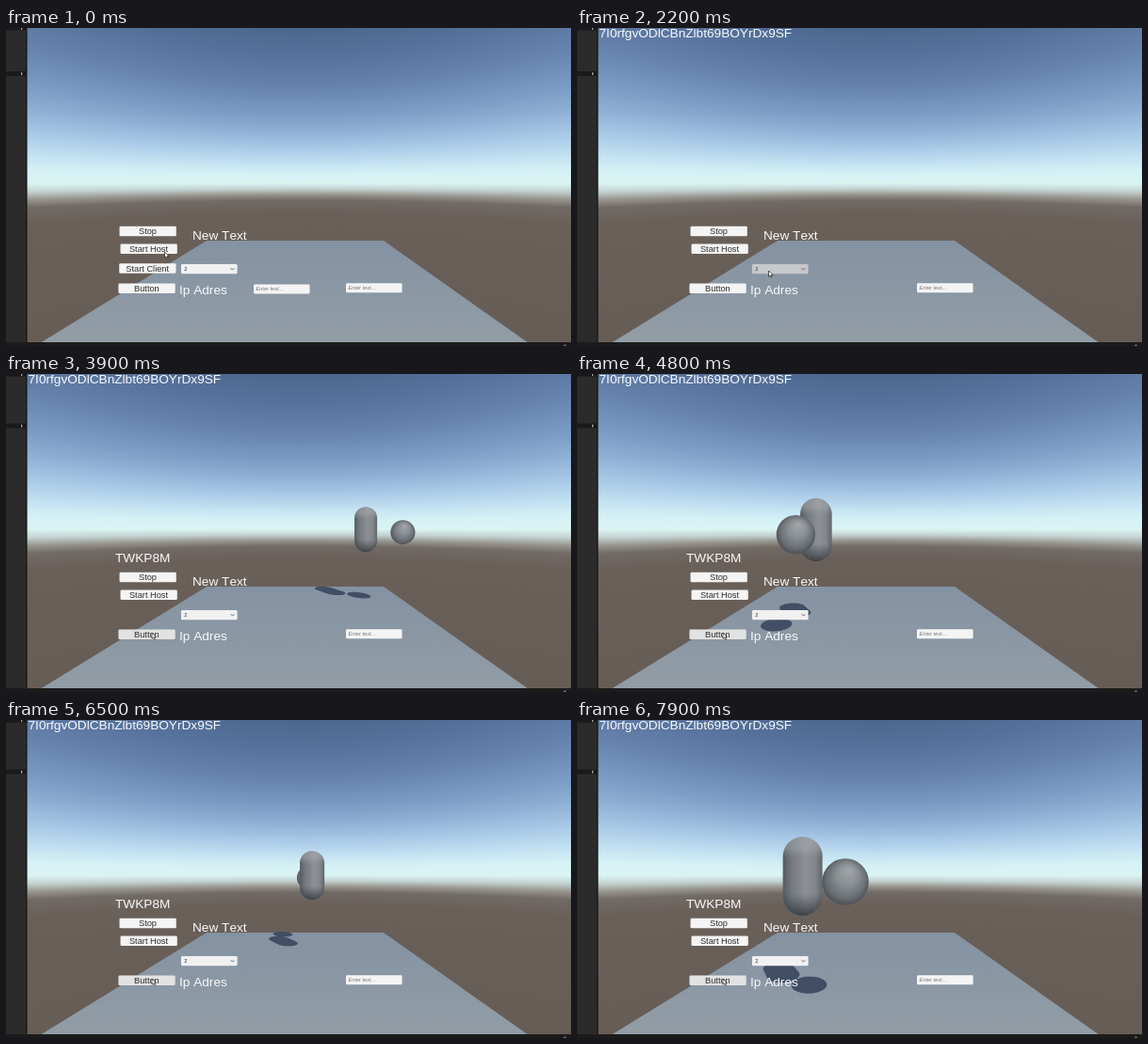
These frames come from a looping animation (600x338 px, 8000 ms). An HTML page with a canvas:

```html
<!DOCTYPE html>
<html lang="en">
<head>
<meta charset="utf-8">
<title>Network lobby scene</title>
<style>
html, body { margin: 0; width: 100%; height: 100%; overflow: hidden; background: #2b2b2b; }
canvas, svg { position: absolute; left: 0; top: 0; width: 600px; height: 338px; }
text { font-family: "Liberation Sans", Arial, sans-serif; font-kerning: none; }
.big { font-size: 13.65px; fill: #f8f9fa; }
.label { font-size: 9.25px; fill: #2e2e2e; text-anchor: middle; }
.hint { font-size: 5.6px; font-style: italic; fill: #767676; }
.value { font-size: 5.6px; fill: #323232; }
</style>
</head>
<body>
<canvas id="sky" width="600" height="338"></canvas>
<svg id="stage" viewBox="0 0 600 338">
  <defs>
    <radialGradient id="ball" cx=".5" cy=".5" r=".56" fx=".58" fy=".24">
      <stop offset="0" stop-color="#a3a7aa"/>
      <stop offset=".4" stop-color="#8b9094"/>
      <stop offset=".75" stop-color="#696e73"/>
      <stop offset="1" stop-color="#41464b"/>
    </radialGradient>
    <linearGradient id="tube">
      <stop offset="0" stop-color="#555b61"/>
      <stop offset=".22" stop-color="#74797e"/>
      <stop offset=".58" stop-color="#8d9195"/>
      <stop offset=".82" stop-color="#81868a"/>
      <stop offset="1" stop-color="#60656a"/>
    </linearGradient>
    <linearGradient id="caps" x2="0" y2="1">
      <stop offset="0" stop-color="#b4bac0" stop-opacity=".35"/>
      <stop offset=".14" stop-color="#b0b4b8" stop-opacity=".4"/>
      <stop offset=".27" stop-color="#a0a4a8" stop-opacity="0"/>
      <stop offset=".72" stop-color="#34393e" stop-opacity="0"/>
      <stop offset="1" stop-color="#30353a" stop-opacity=".85"/>
    </linearGradient>
    <linearGradient id="floor" x2="0" y2="1">
      <stop offset="0" stop-color="#8492a2"/>
      <stop offset="1" stop-color="#929da5"/>
    </linearGradient>
  </defs>
  <path d="M213 226H401L555 335H36Z" fill="url(#floor)"/>
  <g id="scene">
    <path id="tubeShadow" fill="#414e65"/>
    <path id="ballShadow" fill="#414e65"/>
    <g id="solids">
      <g id="capsule">
        <rect x="-.5" y="-1" width="1" height="2" rx=".5" fill="url(#tube)"/>
        <rect x="-.5" y="-1" width="1" height="2" rx=".5" fill="url(#caps)"/>
      </g>
      <circle id="sphere" r=".5" fill="url(#ball)"/>
    </g>
  </g>
  <g id="ui"></g>
  <g id="frame">
    <path d="M0 0H22V338H0Z" fill="#2b2b2b"/>
    <path d="M0 0H22V2.5H0ZM21 0H22.5V338H21Z" fill="#191919"/>
    <g id="divider">
      <path d="M0 46H21V51H0Z" fill="#1a1a1a"/>
      <path d="M16 47.3h1.2v2.6h-1.2z" fill="#b5b5b5"/>
    </g>
    <path d="M16 0h1.2v2h-1.2z" fill="#a5a5a5"/>
    <path d="M0 334H600V338H0Z" fill="#1b1b1b"/>
    <path d="M592.5 336.6h2v1.4h-2z" fill="#8a8a8a"/>
  </g>
  <path id="cursor" d="M0 0V6.2L1.5 4.9 2.5 7.1 3.6 6.6 2.6 4.5H4.5Z" fill="#fff" stroke="#1c1c1c" stroke-width=".7"/>
</svg>
<script>
const LOOP = 8000, STEP = 100;
const CX = 314, CY = 164, FOCAL = 284, GROUND = 3.3;
const $ = id => document.getElementById(id);

function paintSky() {
  const ctx = $("sky").getContext("2d");
  const fill = ctx.createLinearGradient(0, -164, 0, 176);
  const stops = [[0, "#4c678f"], [30, "#56729c"], [60, "#6480ab"], [90, "#7a99c3"],
    [110, "#90afd5"], [130, "#accce8"], [145, "#c5e3f2"], [155, "#d5f1f5"],
    [165, "#daf4f2"], [171, "#c3d2d0"], [177, "#98958f"], [183, "#716a65"],
    [196, "#6a605a"], [340, "#655b55"]];
  stops.forEach(([y, c]) => fill.addColorStop(y / 340, c));
  ctx.fillStyle = fill;
  // Lines of equal elevation bend into hyperbolas away from the centre.
  for (let x = 22; x < 600; x++) {
    ctx.setTransform(1, 0, 0, Math.hypot(1, (x - CX) / FOCAL), 0, CY);
    ctx.fillRect(x, -170, 1, 350);
  }
}

function add(parent, tag, attrs, text) {
  const el = document.createElementNS("http://www.w3.org/2000/svg", tag);
  for (const key in attrs) el.setAttribute(key, attrs[key]);
  if (text) el.textContent = text;
  parent.appendChild(el);
  return el;
}

const ui = $("ui");
const group = () => add(ui, "g", {});
const box = (g, x, y, w = 60, h = 10.3) =>
  add(g, "rect", { x, y, width: w, height: h, rx: 1.3, fill: "#f4f4f4" });
const big = (x, y, s) => add(ui, "text", { class: "big", x, y }, s);

function button(x, y, s) {
  const g = group(), rect = box(g, x, y, 60.3, 10.5);
  add(g, "text", { class: "label", x: x + 30, y: y + 8.4 }, s);
  return { g, rect };
}

function input(x, y) {
  const g = group();
  box(g, x, y, 59.6, 10);
  add(g, "text", { class: "hint", x: x + 2.6, y: y + 6.9 }, "Enter text...");
  return g;
}

function dropdown(x, y) {
  const g = group(), rect = box(g, x, y, 59.6, 10.2);
  add(g, "text", { class: "value", x: x + 3.3, y: y + 7 }, "2");
  add(g, "path", { d: `M${x + 52.6} ${y + 4.2}l1.9 1.9 1.9-1.9`, fill: "none", stroke: "#444", "stroke-width": .8 });
  return rect;
}

function optionList(x, y) {
  const g = group();
  box(g, x, y, 59.6, 17.6);
  ["2", "3"].forEach((s, i) =>
    add(g, "text", { class: "value", x: x + 7, y: y + 6.8 + i * 8.3 }, s));
  add(g, "path", { d: `M${x + 2.3} ${y + 5}l1.2 1.5 2-3`, fill: "none", stroke: "#333", "stroke-width": .7 });
  return g;
}

const idText = big(23.5, 10.3, "7I0rfgvODlCBnZlbt69BOYrDx9SF");
const joinCode = big(116, 200.3, "TWKP8M");
big(198, 224.9, "New Text");
big(184, 283, "Ip Adres");
button(120.5, 210.8, "Stop");
button(121.5, 229.6, "Start Host");
const client = button(120.2, 250.2, "Start Client");
const spawn = button(119.4, 271.6, "Button");
const address = input(263, 272.4);
input(361, 271.2);
const picker = dropdown(186, 251);
const options = optionList(186, 261.2);

const clamp = v => Math.max(0, Math.min(1, v));
const ramp = (t, a, b) => clamp((t - a) / (b - a));
const smooth = u => u * u * (3 - 2 * u);

// Each key is [time, ...values].
function track(keys, t, ease = u => u) {
  let i = 0;
  while (i < keys.length - 2 && t >= keys[i + 1][0]) i++;
  const a = keys[i], b = keys[i + 1], u = ease(ramp(t, a[0], b[0]));
  return a.slice(1).map((v, k) => v + (b[k + 1] - v) * u);
}

const pointer = [[0, 168.5, 238], [800, 154, 254], [1400, 154, 254], [1800, 176, 243],
  [2200, 203.5, 258], [2600, 203.5, 258], [2800, 201, 266], [3200, 155, 275]];
const walk = [[3400, -2.45, -3], [3500, -2.45, -3], [3900, 2.83, 1.8], [4400, 2, .8],
  [4800, -1.79, -1.55], [5200, -2, -.6], [5900, -.83, .75], [6600, .5, .9],
  [7100, -.7, -.5], [7450, 1.6, -1], [7900, -1.77, -3.24]];
const turn = [[3400, 6], [3900, -34], [4800, -97], [5900, -202], [7100, -327], [7900, -401]];

function place(el, x, y, z) {
  const k = FOCAL / (z + 10);
  el.setAttribute("transform", `translate(${CX + x * k} ${CY - y * k}) scale(${k})`);
}

// Sun pitched 50 degrees and turned 30; `half` is the stretch of a tall body.
function shadow(el, x, y, z, half) {
  const drop = (GROUND + y) * .839;
  const points = [];
  for (let i = 0; i < 48; i++) {
    const a = (i + .5) * Math.PI / 24, c = Math.cos(a);
    const u = drop + .65 * c + half * Math.sign(c), v = .5 * Math.sin(a);
    const k = FOCAL / (z + 10 + .866 * u + .5 * v);
    points.push((CX + (x - .5 * u + .866 * v) * k).toFixed(2) + " " + (CY + GROUND * k).toFixed(2));
  }
  el.setAttribute("d", "M" + points.join("L") + "Z");
}

function drawPlayer(t) {
  const [x, z] = track(walk, t, smooth);
  const angle = track(turn, t)[0] * Math.PI / 180;
  const bx = x + 1.57 * Math.cos(angle), bz = z + 1.57 * Math.sin(angle);
  place($("capsule"), x, -.05, z);
  place($("sphere"), bx, -.16, bz);
  shadow($("tubeShadow"), x, -.05, z, .42);
  shadow($("ballShadow"), bx, -.16, bz, 0);
  const front = $(bz < z ? "sphere" : "capsule");
  if ($("solids").lastElementChild !== front) $("solids").appendChild(front);
}

const show = (el, on) => el.setAttribute("opacity", +on);
const tint = (el, c) => el.setAttribute("fill", c);

function render(t) {
  const [px, py] = track(pointer, t, smooth);
  $("cursor").setAttribute("transform", `translate(${px} ${py})`);
  show(idText, t >= 300);
  show(client.g, t < 1100);
  show(address, t < 1100);
  show(joinCode, t >= 3400);
  show(options, ramp(t, 2200, 2400) * (1 - ramp(t, 2700, 2900)));
  show($("scene"), t >= 3400);
  tint(client.rect, t >= 900 ? "#c8c8c8" : "#f4f4f4");
  tint(picker, t >= 2100 && t < 2900 ? "#c6c8ca" : "#f1f1f1");
  tint(spawn.rect, t < 3100 ? "#f4f4f4" : t >= 3300 && t < 3500 ? "#c8c8c8" : "#e2e2e2");
  $("divider").setAttribute("transform", `translate(0 ${t >= 3400 ? 6.5 : 0})`);
  drawPlayer(t);
}

function tick() {
  const t = performance.now() % LOOP;
  render(Math.floor(t / STEP) * STEP);
  requestAnimationFrame(tick);
}

paintSky();
tick();
</script>
</body>
</html>
```
